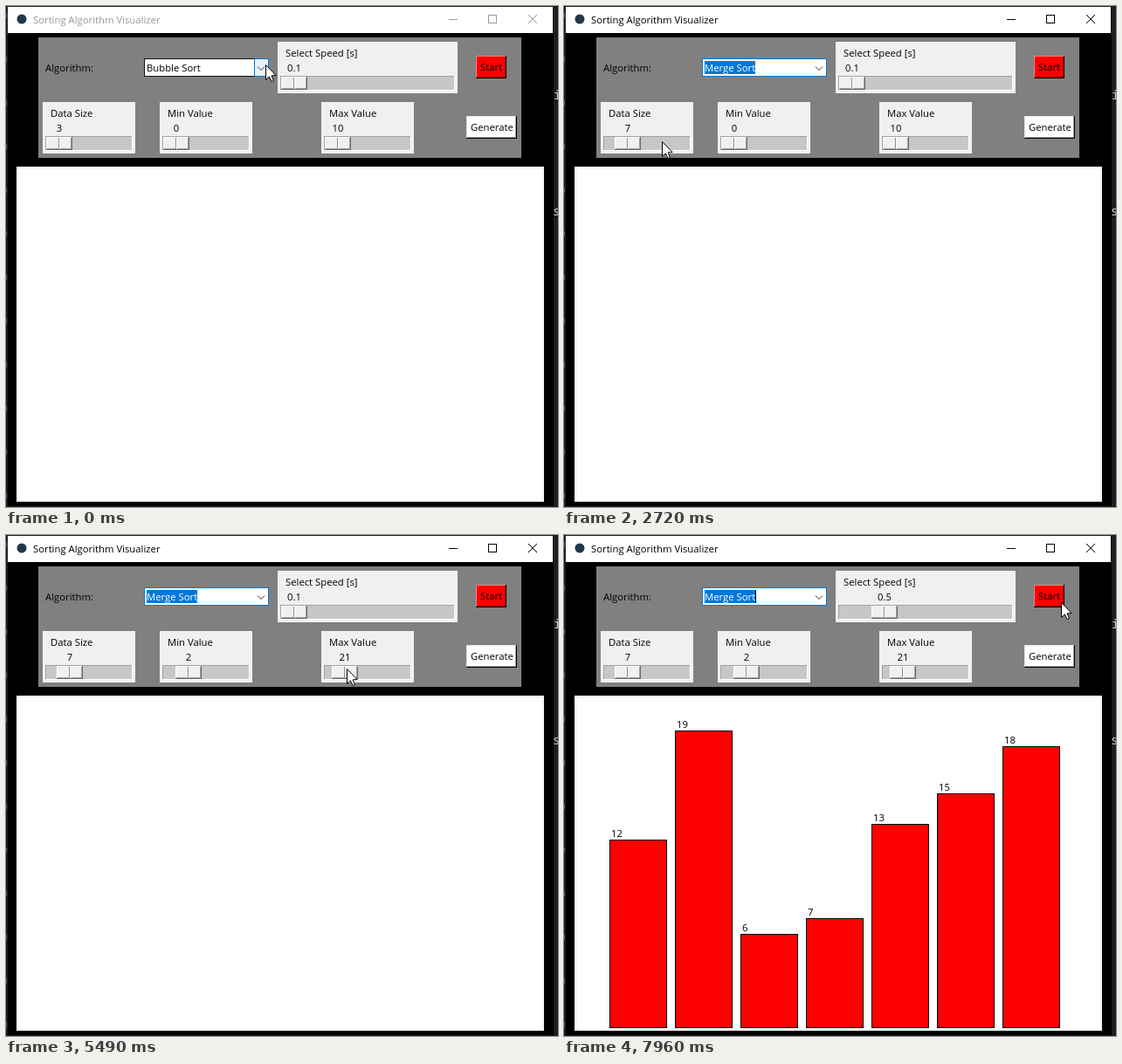
An HTML page with a canvas that plays this animation: 632x574 px, repeating every 8000 ms.

```html
<!DOCTYPE html>
<html lang="en">
<head>
<meta charset="utf-8">
<title>Sorting Algorithm Visualizer</title>
<style>
  html, body { margin: 0; width: 632px; height: 574px; overflow: hidden; background: #000; }
  canvas { display: block; }
</style>
</head>
<body>
<canvas id="stage" width="632" height="574"></canvas>
<script>
const ctx = document.getElementById('stage').getContext('2d');
const LOOP = 8000, BLUE = '#0078d7', FACE = '#f0f0f0';
const UI_FONT = '11.3px "Open Sans", "Noto Sans", sans-serif';
const CODE_FONT = '14px "Noto Sans Mono", monospace';

// Each click: where the pointer lands, when it arrives, presses and releases, how far it drags
const click = (x, y, arrive, press, release, drag = 0) => ({ x, y, arrive, press, release, drag });
const openList = click(294, 71, 160, 160, 280);
const pickItem = click(205, 119, 800, 1030, 1110);
const setSize = click(65, 156, 1700, 1870, 2540, 12);
const setMin = click(197, 153, 3050, 3250, 3820, 14);
const setMax = click(382, 153, 4600, 4670, 5490, 8.5);
const setSpeed = click(331, 82, 6260, 6300, 6990, 37);
const generate = click(530, 137, 7400, 7430, 7560);
const goStart = click(569, 77, 7960, LOOP, LOOP);
const clicks = [openList, pickItem, setSize, setMin, setMax, setSpeed, generate, goStart];

const scale = (x, y, w, label, min, max, res, action) => ({ x, y, w, label, min, max, res, action });
const scales = [
  scale(42, 110, 106, 'Data Size', 3, 25, 1, setSize),
  scale(176, 110, 106, 'Min Value', 0, 10, 1, setMin),
  scale(361, 110, 106, 'Max Value', 10, 100, 1, setMax),
  scale(311, 41, 206, 'Select Speed [s]', 0.1, 1.9, 0.1, setSpeed)
];
const options = ['Bubble Sort', 'Quick Sort', 'Merge Sort'];
const data = [12, 19, 6, 7, 13, 15, 18];

const held = (c, t) => t >= c.press && t < c.release;
const mix = (a, b, k) => a + (b - a) * k;

function ease(t, from, to) {
  const k = Math.min(1, Math.max(0, (t - from) / (to - from)));
  return k * k * (3 - 2 * k);
}

// The drag is done well before the button is released
const dragged = (c, t) => c.drag * ease(t, c.press, mix(c.press, c.release, 0.6));

function pointer(t) {
  let x = 297, y = 67, left = 40;
  for (const c of clicks) {
    const k = ease(t, left, c.arrive);
    x = mix(x, c.x, k) + dragged(c, t);
    y = mix(y, c.y, k);
    left = c.release;
  }
  return [x, y];
}

function rect(x, y, w, h, color) {
  ctx.fillStyle = color;
  ctx.fillRect(x, y, w, h);
}

function box(x, y, w, h, fill, border) {
  rect(x, y, w, h, border);
  rect(x + 1, y + 1, w - 2, h - 2, fill);
}

function disc(x, y, r, color) {
  ctx.fillStyle = color;
  ctx.beginPath();
  ctx.arc(x, y, r, 0, 2 * Math.PI);
  ctx.fill();
}

function text(str, x, y, color = '#000', align = 'left') {
  ctx.fillStyle = color;
  ctx.textAlign = align;
  ctx.fillText(str, x, y);
}

function lines(color, ...shapes) {
  ctx.strokeStyle = color;
  ctx.beginPath();
  for (const pts of shapes) pts.forEach(([x, y], i) => i ? ctx.lineTo(x, y) : ctx.moveTo(x, y));
  ctx.stroke();
}

function bevel(x, y, w, h, fill, light, dark) {
  rect(x, y, w, h, dark);
  rect(x, y, w - 1, h - 1, light);
  rect(x + 1, y + 1, w - 2, h - 2, fill);
}

// Two-pixel border: outer edges, then inner edges
function relief(x, y, w, h, fill, light, light2, dark, dark2) {
  bevel(x, y, w, h, fill, light, dark2);
  bevel(x + 1, y + 1, w - 2, h - 2, fill, light2, dark);
}

const raised = (x, y, w, h) => relief(x, y, w, h, FACE, '#fff', FACE, '#a0a0a0', '#696969');
const sunken = (x, y, w, h) => relief(x, y, w, h, FACE, '#a0a0a0', '#696969', '#e3e3e3', '#fff');

function drawEditor() {
  rect(0, 0, 632, 574, '#1e1e1e');
  for (let y = 8; y < 574; y += 50) rect(0, y, 1, 6, '#35658c');
  ctx.font = CODE_FONT;
  text('i', 627, 107, '#ccc');
  text('s', 626, 240, '#ccc');
}

function drawWindow(active) {
  const ink = active ? '#000' : '#999';
  rect(2, 1, 625, 572, '#000');
  rect(2, 1, 624, 30, '#fff');
  disc(18, 15, 5.5, '#20384c');
  text('Sorting Algorithm Visualizer', 31, 20, ink);
  lines(ink, [[507, 15.5], [517, 15.5]], [[598, 10], [608, 20]], [[608, 10], [598, 20]]);
  ctx.strokeRect(552.5, 10.5, 9, 9);
  rect(37, 36, 553, 138, '#808080');
  rect(12, 184, 604, 384, FACE);
  rect(14, 186, 600, 380, '#fff');
}

function drawScale({ x, y, w, label, min, max, res, action }, t) {
  const unit = (w - 38) / (max - min) * res;
  const steps = Math.round(dragged(action, t) / unit);
  const left = Math.round(x + 4 + steps * unit), top = y + 40;
  rect(x, y, w, 59, FACE);
  text(label, x + 9, y + 17);
  text((min + steps * res).toFixed(res < 1 ? 1 : 0), left + 15, y + 34, '#000', 'center');
  bevel(x + 3, y + 39, w - 6, 17, '#c6c8c8', '#a0a0a0', '#fff');
  (held(action, t) ? sunken : raised)(left, top, 30, 15);
  rect(left + 14, top + 1, 1, 13, '#8c8c8c');
  rect(left + 15, top + 1, 1, 13, '#fff');
}

function drawCombo(t) {
  const chosen = t >= pickItem.release, open = t >= openList.release;
  text('Algorithm:', 45, 75);
  box(158, 60, 143, 21, '#fff', chosen ? BLUE : '#111');
  if (chosen) {
    rect(161, 63, 58, 15, BLUE);
    text(options[2], 161, 75, '#fff');
    if ((t - pickItem.release) % 900 < 600) rect(219, 63, 1, 15, '#000');
  } else {
    text(options[0], 161, 75);
    box(284, 60, 17, 21, open ? '#cce4f7' : '#e5f1fb', open ? '#005499' : BLUE);
  }
  lines('#333', [[288, 69.5], [292, 73.5], [296, 69.5]]);
}

function drawList(y) {
  const hover = Math.min(2, Math.max(0, Math.floor((y - 82) / 16)));
  box(158, 81, 143, 50, '#fff', '#000');
  options.forEach((name, i) => {
    if (i === hover) rect(159, 82 + i * 16, 141, 16, BLUE);
    text(name, 161, 94 + i * 16, i === hover ? '#fff' : '#000');
  });
}

function drawButtons(t) {
  const down = held(generate, t);
  relief(538, 57, 35, 26, '#f00', '#ff7f7f', '#f00', '#900', '#000');
  text('Start', 543, 74);
  if (down) sunken(527, 126, 58, 26);
  else relief(527, 126, 58, 26, '#fff', '#e6e6e6', '#fff', '#999', '#000');
  text('Generate', 532 + down, 143 + down);
}

function drawBars() {
  const peak = Math.max(...data);
  data.forEach((v, i) => {
    const x = 52 + i * 75, y = Math.round(564 - v / peak * 340);
    box(x, y, 66, 565 - y, '#f00', '#000');
    text(v, x + 2, y - 3);
  });
}

const arrow = new Path2D('M0 0V17L3.9 13.4 6.6 19 9 18 6.5 12.4 11.6 12Z');

function drawPointer(x, y, down) {
  if (down) disc(x, y, 13, 'rgba(255, 245, 40, .58)');
  ctx.save();
  ctx.translate(Math.round(x) + 0.5, Math.round(y) + 0.5);
  ctx.fillStyle = '#fff';
  ctx.fill(arrow);
  ctx.strokeStyle = '#000';
  ctx.stroke(arrow);
  ctx.restore();
}

function draw(t) {
  const [x, y] = pointer(t);
  drawEditor();
  ctx.font = UI_FONT;
  drawWindow(t >= openList.press);
  drawCombo(t);
  scales.forEach(s => drawScale(s, t));
  drawButtons(t);
  if (t >= generate.release) drawBars();
  if (t >= openList.release && t < pickItem.release) drawList(y);
  drawPointer(x, y, clicks.some(c => held(c, t)));
}

const start = performance.now();
function tick() {
  draw((performance.now() - start) % LOOP);
  requestAnimationFrame(tick);
}
tick();
</script>
</body>
</html>
```
